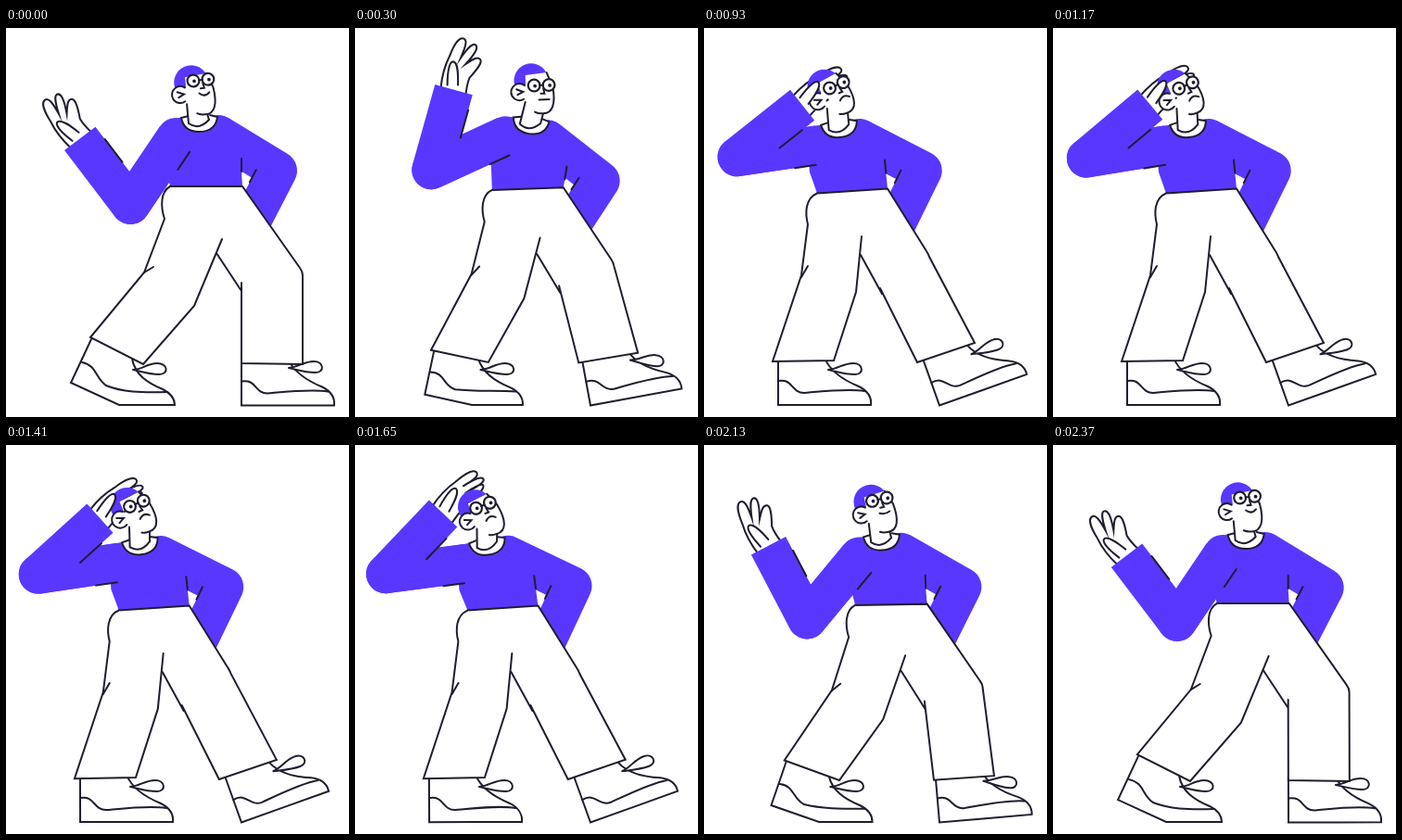
An HTML page with a canvas that plays this animation: 370 px wide and 420 px high, repeating every 2.4 s.

```html
<!DOCTYPE html>
<html lang="en">
<head>
<meta charset="utf-8">
<title>Waving walker</title>
<style>
html, body { margin: 0; width: 100%; height: 100%; overflow: hidden; background: #fff; }
canvas { display: block; width: 370px; height: 420px; }
</style>
</head>
<body>
<canvas id="stage"></canvas>
<script>
const W = 370, H = 420, LOOP = 2400, STEP = 30;
const INK = '#1f1d2e', BLUE = '#5a37ff', WHITE = '#fff';
const canvas = document.getElementById('stage');
const ctx = canvas.getContext('2d');
const dpr = window.devicePixelRatio || 1;
canvas.width = W * dpr;
canvas.height = H * dpr;

// time, stride, lean, ear x/y from collar, tilt, glasses x/y, smile, upper arm, forearm, fingers closed
const KEYS = [
  [0, 0, 0, -20, -40, -6, 23.5, -13.5, 4, 124, -127.3, 0],
  [300, .53, 8.7, -10, -45, -2, 24, -6.5, 0, 155.2, -74.4, 0],
  [570, .98, -5, -24, -39.5, -22, 25, -8, -4, 172.8, -37, 1],
  [690, 1, -5.4, -24, -39, -23, 25.5, -8, -4, 172.6, -37.4, 1],
  [1170, 1, -5.4, -23, -38.5, -24, 25, -8, -4, 170.7, -40, 1],
  [1650, 1.01, -7.5, -22, -36, -22, 21.5, -10, -4, 172.5, -46.4, 1],
  [1890, .69, -10, -27, -33, -30, 21.5, -8.5, -3.5, 150.7, -82.7, 0],
  [2190, .17, -1, -21, -39, -9, 23, -13, 3, 127, -122, 0]
];
KEYS.push([LOOP, ...KEYS[0].slice(1)]);

const BACK_FOOT = [
  'M92,336 L70,383 L122,407 L182,407 C182,399 177,394 169,390 C152,383 139,374 136,357',
  'M80,356 L80,407 L130,407 L180,407 C181,398 175,391 167,387 C150,380 136,371 130,356'
];
const BACK_SOLE = [
  'M82,361 C98,364 96,378 108,386 C125,393 145,394 174,393',
  'M80,381 C96,378 94,394 108,394 C130,392 156,389 173,392'
];
const LACE = [
  'M137,369 C147,369 152,362 163,362 C175,362 176,374 165,374 C155,374 146,371 137,369',
  'M134,369 C145,368 150,362 161,362 C172,362 173,374 163,374 C152,374 143,371 134,369'
];
const FRONT_LEG = [
  'M177,171 L255,171 L317,259 Q320,263 320,267 L320,363 L254,362 L254,283 L227,243',
  'M122,178.5 L198,173.5 L240,241 Q242,244 243,247 L292,340 L230,361 L192,288 L169,245'
];
const FRONT_LINES = [
  'M177,171 L255,171 L317,259 Q320,263 320,267 L320,363 L254,362 L254,275 M254,284 L227,243',
  'M122,178.5 L198,173.5 L240,241 Q242,244 243,247 L292,340 L230,361 L190,281 M192,287 L169,245'
];
const BACK_LEG = [
  'M177,171 C166,177 167,194 171,206 L149,264 L91,334 L148,363 L203,300 L233,228',
  'M122,178.5 C109,184 109,200 112,212 L105,267 L74,360 L140,359 L164,285 L170,225'
];
const KNEE = ['M149,264 L159,258', 'M105,269 L112,257'];
const HAND = [
  'M-14,2 C-17,-15 -16,-24 -14,-34 C-13,-46 -10,-56 -5,-56 C0,-56 0,-49 -2,-35 C2,-46 5,-53 9,-53 C14,-52 12,-44 5,-30 C11,-37 15,-42 19,-39 C22,-36 18,-27 13,-17 C12,-10 13,-4 14,2',
  'M-14,2 C-17,-15 -16,-24 -14,-34 C-13,-46 -10,-57 -5,-57 C0,-57 -1,-49 -5,-36 C-2,-48 1,-57 5,-57 C10,-57 6,-44 2,-32 C4,-42 7,-52 10,-52 C15,-51 13,-32 12,-18 C12,-10 13,-4 14,2'
];

const rad = deg => deg * Math.PI / 180;
const lerp = (a, b, k) => a + (b - a) * k;

function rot([x, y], deg, [ox, oy] = [0, 0]) {
  const c = Math.cos(rad(deg)), s = Math.sin(rad(deg));
  return [ox + x * c - y * s, oy + x * s + y * c];
}

// Blends two paths with the same commands.
function mix([a, b], k) {
  const end = b.match(/-?[\d.]+/g);
  let i = 0;
  return a.replace(/-?[\d.]+/g, n => lerp(+n, +end[i++], k).toFixed(2));
}

const slope = (i, c) => (KEYS[i + 1][c] - KEYS[i][c]) / (KEYS[i + 1][0] - KEYS[i][0]);

// Monotone tangent: flat at turning points.
function tangent(i, c) {
  if (i === 0 || i === KEYS.length - 1) return 0;
  const a = slope(i - 1, c), b = slope(i, c);
  return a * b <= 0 ? 0 : 2 * a * b / (a + b);
}

function poseAt(t) {
  let i = 0;
  while (t >= KEYS[i + 1][0]) i++;
  const from = KEYS[i], to = KEYS[i + 1];
  const span = to[0] - from[0], k = (t - from[0]) / span;
  const k2 = k * k, k3 = k2 * k, ease = 3 * k2 - 2 * k3;
  return from.slice(1).map((v, n) => {
    const c = n + 1;
    return lerp(v, to[c], ease) +
      span * ((k3 - 2 * k2 + k) * tangent(i, c) + (k3 - k2) * tangent(i + 1, c));
  });
}

function fill(d, color = WHITE) {
  ctx.fillStyle = color;
  ctx.fill(new Path2D(d));
}

function line(d, color = INK, width = 2, cap = 'round') {
  ctx.strokeStyle = color;
  ctx.lineWidth = width;
  ctx.lineCap = cap;
  ctx.lineJoin = width > 5 ? 'round' : 'miter';
  ctx.stroke(new Path2D(d));
}

function shape(d) {
  fill(d);
  line(d);
}

function disc(x, y, r, color, outline) {
  ctx.beginPath();
  ctx.arc(x, y, r, 0, 7);
  ctx.fillStyle = color;
  ctx.fill();
  if (!outline) return;
  ctx.strokeStyle = INK;
  ctx.lineWidth = outline;
  ctx.stroke();
}

function inside([x, y], deg, draw) {
  ctx.save();
  ctx.translate(x, y);
  ctx.rotate(rad(deg));
  draw();
  ctx.restore();
}

const poly = (...pts) => 'M' + pts.map(p => p.join()).join('L');

function shoe(k) {
  shape(mix(BACK_FOOT, k));
  line(mix(BACK_SOLE, k));
}

// A line along one edge of a sleeve, between two distances from the elbow.
function crease(elbow, deg, side, a, b) {
  line(poly(rot([a, side], deg, elbow), rot([b, side], deg, elbow)));
}

function drawFace(gx, gy, smile) {
  const jaw = 'M30,-20 L36,-5 C39,14 35,25 24,24 Q19,24 16,22';
  fill(jaw + ' L7,-18 Z');
  line(jaw);
  fill('M7,-7 L7,-18 L29.7,-20 A18.5,18.5 0 0 0 -5,-8 Z', BLUE);
  disc(0, 0, 9, WHITE);
  ctx.beginPath();
  ctx.arc(0, 0, 9, rad(60), rad(310));
  ctx.strokeStyle = INK;
  ctx.lineWidth = 2;
  ctx.stroke();
  line('M-3,-3 L4,0 L-2,3');
  inside([gx, gy], 0, () => {
    for (const x of [-8, 8]) {
      disc(x, 0, 6.4, WHITE, 2.2);
      disc(x + 1, .5, 1.9, INK);
    }
    line('M-2,0 L2,0');
    line('M2,4 L3,9 L-1,9');
    line(`M-3,${15.5 - smile / 3} Q2.5,${15.5 + smile} 8,${15.5 - smile / 3}`);
  });
}

function draw(t) {
  const [u, lean, ex, ey, tilt, gx, gy, smile, upper, fore, closed] = poseAt(t);
  const waistL = [lerp(177, 122, u), lerp(171, 178.5, u)];
  const waistR = [lerp(255, 198, u), lerp(171, 173.5, u)];
  const hip = [(waistL[0] + waistR[0]) / 2, (waistL[1] + waistR[1]) / 2];
  const body = (x, y) => rot([x, y], lean, hip);
  const collar = body(-8, -59);
  const shoulder = body(-32.5, -53);
  const elbow = rot([88, 0], upper, shoulder);
  const wrist = rot([90, 0], fore, elbow);
  const ear = [collar[0] + ex, collar[1] + ey];

  ctx.setTransform(dpr, 0, 0, dpr, 0, 0);
  ctx.fillStyle = WHITE;
  ctx.fillRect(0, 0, W, H);

  // Feet; the front lace swings during the step
  shoe(u);
  shape(mix(LACE, u));
  inside([254, 407.5], -19.6 * u, () => {
    ctx.translate(-80, -407);
    shoe(1);
    inside([131, 366.5], 14 * Math.sin(Math.PI * u), () => {
      ctx.translate(-134, -369);
      shape(LACE[1]);
    });
  });

  // Sweater with the arm on the hip
  const hipElbow = rot([77, -17], lean * .7, hip);
  const hipHand = [waistR[0] + 7, waistR[1] + 43];
  line(poly(body(13, -56), hipElbow, hipHand), BLUE, 42);
  fill(poly(waistL, waistR, body(38, -16), body(38, -40), body(12, -75),
    body(-30, -74), body(-42, -67), body(-44, -25)), BLUE);
  line(poly(body(38, -30), body(38, -16)));
  const hipFore = Math.atan2(hipHand[1] - hipElbow[1], hipHand[0] - hipElbow[0]) * 180 / Math.PI;
  crease(hipElbow, hipFore, 21, 10, 25);

  // Waving arm
  inside(wrist, fore + 90, () => shape(mix(HAND, closed)));
  line(poly(body(-28, -51), shoulder, elbow), BLUE, 42);
  line(poly(shoulder, elbow, wrist), BLUE, 42, 'butt');
  crease(elbow, fore, 21, 42, 73);
  crease(elbow, upper + 180, 21, 60, 83);

  // Trousers
  fill(mix(FRONT_LEG, u));
  line(mix(FRONT_LINES, u));
  shape(mix(BACK_LEG, u));
  line(mix(KNEE, u));

  // Collar, neck and head
  inside(hip, lean, () => shape('M-19,-76 L-27,-74 Q-24,-59 -8,-59 Q10,-59 12,-75 L4,-77'));
  shape(`${poly(rot([6, 11], tilt, ear), body(-19, -68))} Q${body(-8, -60)} ${body(3, -72)} L${rot([26, 20], tilt, ear)}`);
  inside(ear, tilt, () => drawFace(gx, gy, smile));
  inside(wrist, fore + 90, () => shape('M-8,-3 C-12,-18 -13,-29 -8,-29 C-3,-28 0,-18 3,-6'));
}

function tick() {
  const t = performance.now() % LOOP;
  draw(Math.floor(t / STEP) * STEP);
  requestAnimationFrame(tick);
}
tick();
</script>
</body>
</html>
```
